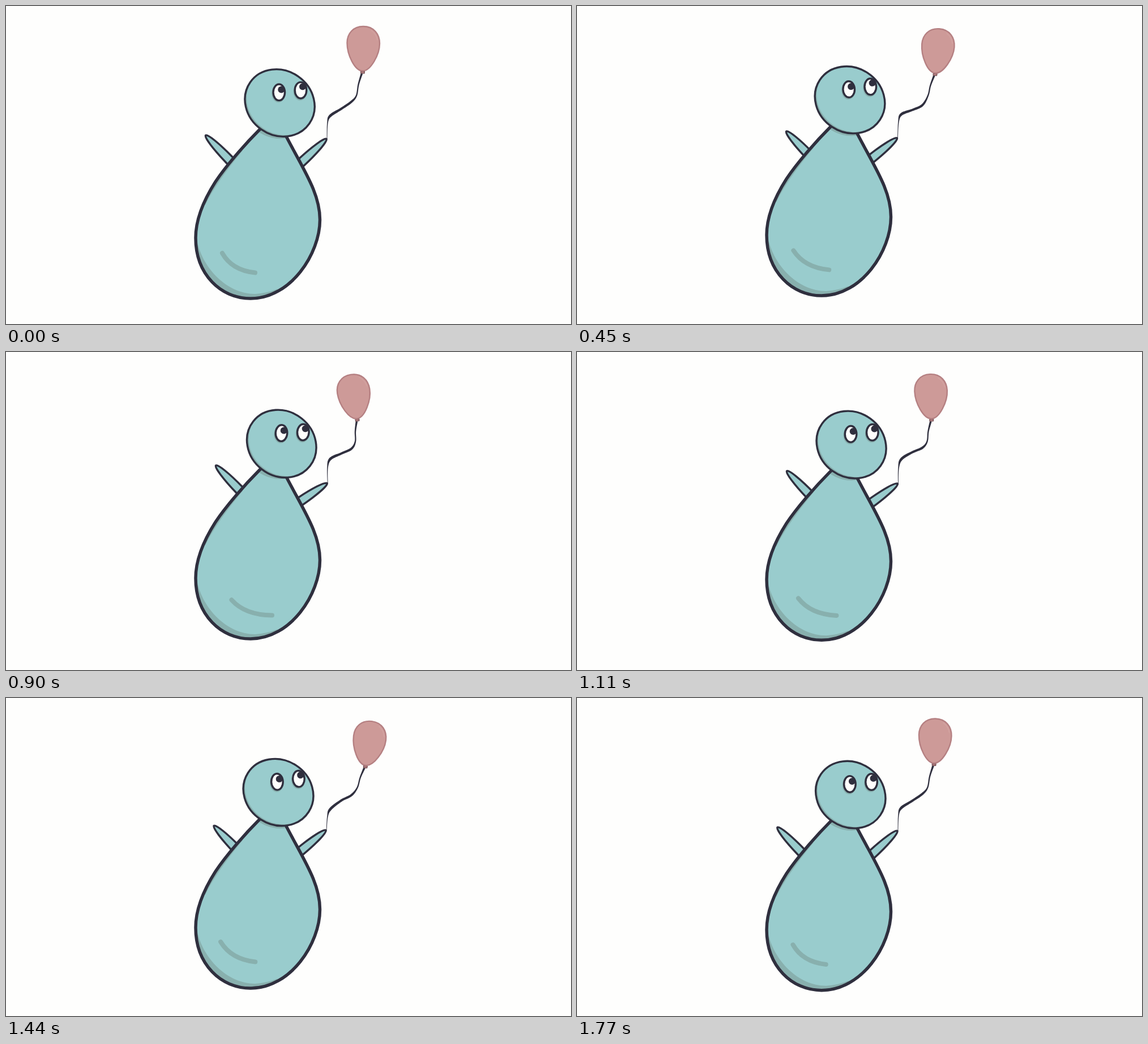
These frames come from a looping animation (998x561 px, 1800 ms). An HTML page:

```html
<!DOCTYPE html>
<html lang="en">
<head>
<meta charset="utf-8">
<title>Balloon</title>
<style>
  html, body { margin: 0; width: 100%; height: 100%; overflow: hidden; background: #fefefd; }
  svg { display: block; width: 100%; height: 100%; }
  .ink { fill: #2f2f3e; }
  .skin { fill: #99cccd; }
  .shade { fill: #88b0ae; }
  .line { fill: none; stroke: #2f2f3e; stroke-width: 3.4; stroke-linejoin: round; }
</style>
</head>
<body>
<svg viewBox="0 0 998 561">
  <defs>
    <path id="bodyShape" d="M460 207 Q454 212 447 219 C420 246 388 283 370 310 C347 346 335 378 335 409
      C335 474 380 516 432 516 C503 516 554.5 437 554.5 377 C554.5 330 526 290 495 230 Q485 211 475 203Z"/>
    <ellipse id="headShape" rx="63.7" ry="57" transform="translate(483.6 171) rotate(35)"/>
    <clipPath id="bodyClip"><use href="#bodyShape"/></clipPath>
    <clipPath id="headClip"><use href="#headShape"/></clipPath>
    <g id="arm">
      <ellipse class="shade" rx="61" ry="7.5"/>
      <ellipse class="skin" rx="60" ry="6.5" cy="-1"/>
      <ellipse class="line" rx="61" ry="7.5"/>
    </g>
    <g id="eye">
      <ellipse class="shade" cx="-1" cy="2" rx="12" ry="16"/>
      <ellipse class="line" rx="10.3" ry="14.3" style="fill:#fefefd"/>
    </g>
  </defs>

  <g id="leftArm"><use href="#arm" transform="translate(395 272) rotate(46)"/></g>
  <g id="rightArm"><use href="#arm" x="-61"/></g>

  <g id="body">
    <use href="#bodyShape" class="skin"/>
    <g clip-path="url(#bodyClip)" class="shade">
      <path d="M337 413 C347 463 391 508 440 508 Q460 507 480 499 L470 530 L340 530 L320 420Z"/>
      <path d="M352 351 Q370 313 418 255 L400 255 Q355 310 343 352Z"/>
      <use href="#headShape" x="-5" y="4"/>
    </g>
    <path id="smile" fill="none" stroke="#88b0ae" stroke-width="8" stroke-linecap="round"/>
    <use href="#bodyShape" class="line" style="stroke-width:5.5"/>
  </g>

  <g id="head">
    <use href="#headShape" class="shade"/>
    <g clip-path="url(#headClip)"><g transform="translate(3 -2.5)"><use href="#headShape" class="skin"/></g></g>
    <use href="#headShape" class="line"/>
    <use href="#eye" x="482.3" y="152.3"/>
    <use href="#eye" x="520.5" y="148.7"/>
    <circle class="ink" cx="486.3" cy="147.5" r="6"/>
    <circle class="ink" cx="524" cy="142.3" r="6"/>
  </g>

  <path id="string" class="ink"/>
  <g id="balloon" stroke-linejoin="round">
    <path d="M626.5 115.5 L633.5 115.5 L633 118.8 L626.8 118.8Z" fill="#b57f80" stroke="#765257" stroke-width="1.3"/>
    <path d="M631 36 C650 36 660 50 660 66 C660 86 644 114.5 630 114.5 C616 114.5 602.5 86 602.5 65 C602.5 49 613 36 631 36Z"
      fill="#cd9a98" stroke="#b58082" stroke-width="2.4"/>
    <path d="M645 43 Q654 49 656 60" fill="none" stroke="#d3a3a1" stroke-width="1.5" stroke-linecap="round"/>
  </g>
</svg>
<script>
const LOOP = 1800, STEP = 30;
const PIVOT = { x: 614, y: 163 }, TILT = 9;
const part = id => document.getElementById(id);
const move = (id, value) => part(id).setAttribute('transform', value);

// Linear interpolation through keyed values
function key(t, times, values) {
  let i = 1;
  while (i < times.length - 1 && t > times[i]) i++;
  const f = (t - times[i - 1]) / (times[i] - times[i - 1]);
  return values[i - 1] + (values[i] - values[i - 1]) * f;
}

// Smooth ribbon with a width at each point
function ribbon(points) {
  const at = i => points[Math.max(0, Math.min(points.length - 1, i))];
  const curve = (i, f, k) => {
    const [a, b, c, d] = [-1, 0, 1, 2].map(o => at(i + o)[k]);
    return b + f / 2 * (c - a + f * (2 * a - 5 * b + 4 * c - d + f * (3 * (b - c) + d - a)));
  };
  const line = [];
  for (let i = 0; i < points.length - 1; i++)
    for (let n = 0; n < 8; n++) line.push([0, 1, 2].map(k => curve(i, n / 8, k)));
  line.push(at(points.length));
  const left = [], right = [];
  line.forEach(([x, y, w], i) => {
    const a = line[Math.max(0, i - 1)], b = line[Math.min(line.length - 1, i + 1)];
    const dx = b[0] - a[0], dy = b[1] - a[1], s = w / 2 / Math.hypot(dx, dy);
    left.push([x - dy * s, y + dx * s]);
    right.unshift([x + dy * s, y - dx * s]);
  });
  return 'M' + left.concat(right).map(p => p.map(v => v.toFixed(2)).join(' ')).join('L') + 'Z';
}

function drawString(t, sway, shift, tip) {
  const wave = (...values) => key(t, [0, 180, 450, 690, 1110, 1440, 1800], values);
  const angle = TILT * sway * Math.PI / 180;
  const c = Math.cos(angle), s = Math.sin(angle);
  const kx = 628.5 - PIVOT.x, ky = 119 - PIVOT.y;
  const knot = [PIVOT.x + kx * c - ky * s + shift.x, PIVOT.y + kx * s + ky * c + shift.y];
  const bend = [619 + sway * 2, 158];
  part('string').setAttribute('d', ribbon([
    [...knot, 3.6],
    [(knot[0] + bend[0]) / 2 - 1.2, (knot[1] + bend[1]) / 2, 2.4],
    [...bend, 2.4],
    [610, wave(169, 175, 175, 172.5, 169, 171.5, 169), 4],
    [592, wave(181.5, 185, 183.5, 181.5, 177, 181, 181.5), 4],
    [573, wave(193.5, 194, 191, 188, 189, 196, 193.5), 4.6],
    [568, wave(206, 207, 204, 203, 205, 209, 206), 1.6],
    [tip.x + 1, tip.y, 0.8]
  ]));
}

function draw(t) {
  const u = Math.min(t, LOOP - t), p = u / 900;
  const swing = (a, b, c) => key(u, [0, 300, 900], [a, b, c]);
  const sway = swing(0, 1, -1);
  const rise = -10 * p, shift = { x: -2 * p, y: 5 * p };
  const tip = { x: 566 - sway * 1.2, y: 234.5 - 3 * p };

  move('body', `translate(0 ${rise})`);
  move('head', `translate(0 ${rise}) rotate(${-3.1 * sway} 470 230)`);
  move('leftArm', `translate(${key(u, [0, 300, 450, 690, 900], [0, 13, 17, 18, 18])} ${swing(0, 0, -28)})`);
  move('rightArm', `translate(${tip.x} ${tip.y}) rotate(${9 * p - 43})`);
  move('balloon', `translate(${shift.x} ${shift.y}) rotate(${TILT * sway} ${PIVOT.x} ${PIVOT.y})`);

  const x1 = swing(382, 377, 398.5), y1 = swing(436, 432.7, 447.3);
  const x2 = swing(440, 437, 470), y2 = swing(470.5, 469, 474.5);
  part('smile').setAttribute('d', `M${x1} ${y1} Q${(x1 + x2) / 2 - 12} ${(y1 + y2) / 2 + 13} ${x2} ${y2}`);

  drawString(t, sway, shift, tip);
}

const start = performance.now();
function tick() {
  const t = (performance.now() - start) % LOOP;
  draw(Math.floor(t / STEP) * STEP);
  requestAnimationFrame(tick);
}
tick();
</script>
</body>
</html>
```
